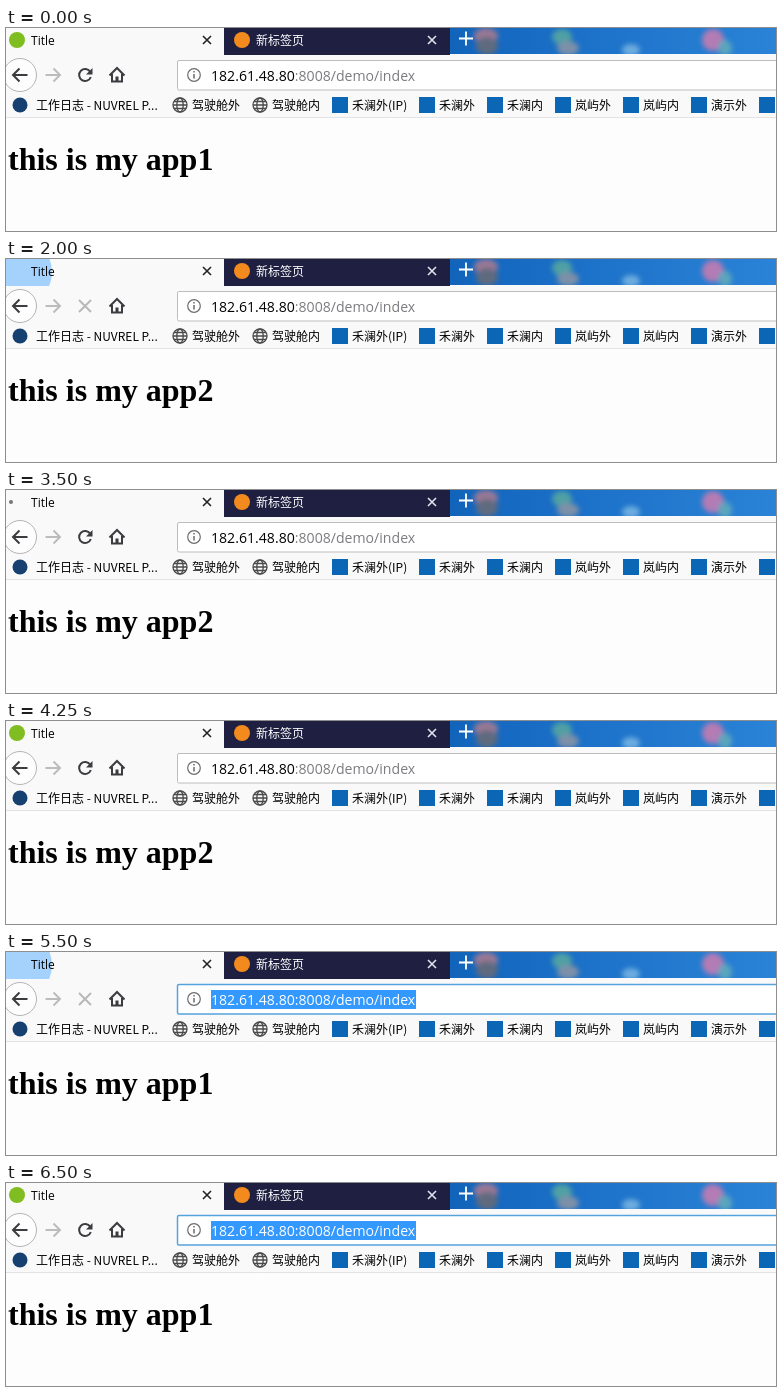
An HTML page for the animation above (7250 ms loop, 770x203 px).

```html
<!DOCTYPE html>
<html lang="zh">
<head>
<meta charset="utf-8">
<style>
  html, body { margin: 0; width: 100%; height: 100%; overflow: hidden; background: #fdfdfd; }
  svg { display: block; }
  text { white-space: pre; }
  .ui { font: 12px "Noto Sans CJK SC", "Noto Sans CJK", "Open Sans", sans-serif; }
  .title { font: 12px "Open Sans", sans-serif; }
  .url { font: 14.1px "Open Sans", sans-serif; }
  .heading { font: bold 32px "Liberation Serif", serif; }
  .line { fill: none; stroke-width: 2; }
</style>
</head>
<body>
<svg width="770" height="203" viewBox="0 0 770 203">
  <defs>
    <linearGradient id="sky">
      <stop offset="0" stop-color="#1264bb"/>
      <stop offset=".45" stop-color="#1d72c9"/>
      <stop offset="1" stop-color="#2a83d6"/>
    </linearGradient>
    <filter id="blur" x="-50%" y="-50%" width="200%" height="200%"><feGaussianBlur stdDeviation="2.5"/></filter>
    <clipPath id="skyClip"><rect x="444" width="326" height="26"/></clipPath>
    <clipPath id="tabClip"><rect width="218" height="27"/></clipPath>
    <g id="globe" fill="none" stroke="#4a4a4a" stroke-width="1.3">
      <circle r="7"/><ellipse rx="3.2" ry="7"/><path d="M-7 0H7M-6-3.5H6M-6 3.5H6"/>
    </g>
  </defs>

  <rect width="770" height="203" fill="#fdfdfd"/>
  <rect width="770" height="90" fill="#f9f9fa"/>
  <path d="M0 89.5H770" stroke="#e3e3e5"/>

  <g clip-path="url(#skyClip)">
    <rect x="444" width="326" height="26" fill="url(#sky)"/>
    <g id="blobs" filter="url(#blur)"></g>
  </g>
  <rect x="218" width="226" height="27" fill="#1f2041"/>
  <circle cx="236" cy="12" r="8" fill="#f28a1e"/>
  <text class="ui" x="250" y="16.5" fill="#fff">新标签页</text>
  <path d="M422 8l8 8m0-8l-8 8" stroke="#e4e4ee" stroke-width="1.6"/>
  <path d="M453 10.5H467M460 3.5V17.5" stroke="#fff" stroke-width="1.8"/>

  <circle id="burst" cx="11" cy="13" clip-path="url(#tabClip)" fill="#a5d1fd"/>
  <circle id="favicon" cx="11" cy="12" r="8" fill="#80bd20"/>
  <circle id="dot" cy="12" r="2" fill="#75757a"/>
  <text class="title" x="25" y="16.5" fill="#000">Title</text>
  <path d="M197 8l8 8m0-8l-8 8" stroke="#222" stroke-width="1.6"/>

  <circle cx="14" cy="47" r="16.5" fill="#fdfdfd" stroke="#b4b4b6"/>
  <path class="line" d="M21.5 47H7.5M13.5 40.5L7 47L13.5 53.5" stroke="#3c3c40"/>
  <path class="line" d="M39.5 47H53.5M47.5 40.5L54 47L47.5 53.5" stroke="#bcbcbe"/>
  <g id="reload">
    <path class="line" d="M84.2 43.8A6 6 0 1 0 84.8 49" stroke="currentColor"/>
    <path d="M86.5 40V46.5H80Z" fill="currentColor"/>
  </g>
  <path id="stop" class="line" d="M73 41l12 12m0-12l-12 12" stroke="#b8b8ba"/>
  <path class="line" d="M103.5 47.5L111 40L118.5 47.5M106 46V53.5H116V46" stroke="#3c3c40"/>
  <rect x="109.5" y="48.5" width="3" height="5" fill="#3c3c40"/>

  <rect id="field" x="171.5" y="32.5" width="620" height="29.5" rx="1.5" fill="#fff"/>
  <circle cx="188" cy="47" r="6.3" fill="none" stroke="#6c6c70" stroke-width="1.2"/>
  <path d="M188 46V50.5M188 43V44.6" stroke="#6c6c70" stroke-width="1.5"/>
  <rect id="selection" x="205" y="38" width="205" height="19" fill="#3399ff"/>
  <text class="url" x="205" y="53"><tspan id="host">182.61.48.80</tspan><tspan id="tail">:8008/demo/index</tspan></text>
  <path id="caret" d="M392.5 38V57" stroke="#111"/>

  <circle cx="14" cy="77" r="7.5" fill="#16406f"/>
  <g id="bookmarks" class="ui" fill="#000"></g>
  <text id="heading" class="heading" x="2" y="142"></text>
</svg>
<script>
const LOOP = 7250;
const $ = id => document.getElementById(id);
const show = (id, on) => $(id).setAttribute("visibility", on ? "visible" : "hidden");
const paint = (id, attrs) => { for (const k in attrs) $(id).setAttribute(k, attrs[k]); };

// Blurred wallpaper icons: x, y, rx, ry, colour
$("blobs").innerHTML = [
  [480, 8, 12, 8, "#9a7894"], [481, 18, 11, 9, "#5f6a7f"],
  [556, 9, 10, 8, "#4fa0a4"], [562, 20, 11, 7, "#7d90a8"],
  [625, 22, 9, 6, "#6cacdf"],
  [707, 12, 11, 11, "#b47cb4"], [719, 20, 7, 8, "#5aa5bd"]
].map(([x, y, rx, ry, c]) =>
  `<ellipse cx="${x}" cy="${y}" rx="${rx}" ry="${ry}" fill="${c}"/>`).join("");

const label = (x, s) => `<text x="${x}" y="82">${s}</text>`;
const globe = (x, s) => `<use href="#globe" x="${x}" y="77"/>` + label(x + 12, s);
const square = (x, s) => `<rect x="${x}" y="69" width="16" height="16" fill="#0b66b5"/>` + label(x + 20, s);
$("bookmarks").innerHTML = label(30, "工作日志 - NUVREL P...") +
  globe(174, "驾驶舱外") + globe(254, "驾驶舱内") + square(326, "禾澜外(IP)") +
  ["禾澜外", "禾澜内", "岚屿外", "岚屿内", "演示外", ""].map((s, i) => square(413 + 68 * i, s)).join("");

const idle = { focus: false, selected: false, caret: false, dot: 0, burst: 0, glow: 1, button: "reload", app: 1 };
const selectUrl = { focus: true, selected: true };
const leaveUrl = { focus: false, selected: false, caret: false };
const burst = { dot: 0, burst: 35, glow: 1, button: "stop" };
const fade = { dot: 0, burst: 225, glow: .3, button: "stop" };
const settle = { burst: 0, button: "disabled" };
const ready = { burst: 0, button: "reload" };

// Each step changes only the listed properties.
const steps = [
  [0, idle],
  [250, selectUrl],
  [500, { selected: false, caret: true }],
  [1000, { caret: false }],
  [1500, { ...leaveUrl, dot: 13 }],
  [1750, { dot: 17, button: "stop" }],
  [2000, { ...burst, app: 2 }],
  [2250, fade],
  [2500, settle],
  [2750, ready],
  [3000, selectUrl],
  [3500, { ...leaveUrl, dot: 5 }],
  [3750, { ...burst, burst: 98, glow: .75 }],
  [4000, fade],
  [4250, ready],
  [4500, selectUrl],
  [5250, { dot: 5, button: "stop" }],
  [5500, { ...burst, app: 1 }],
  [5750, fade],
  [6000, settle],
  [6250, ready]
];

function render(time) {
  const s = Object.assign({}, ...steps.filter(([t]) => t <= time).map(([, change]) => change));
  show("favicon", !s.dot && !s.burst);
  show("dot", s.dot);
  show("burst", s.burst);
  show("reload", s.button !== "stop");
  show("stop", s.button === "stop");
  show("selection", s.selected);
  show("caret", s.caret);
  paint("dot", { cx: s.dot });
  paint("burst", { r: s.burst, opacity: s.glow });
  paint("reload", { color: s.button === "disabled" ? "#b8b8ba" : "#3c3c40" });
  paint("field", { stroke: s.focus ? "#55a3dd" : "#bdbdc0", "stroke-width": s.focus ? 1.5 : 1 });
  paint("host", { fill: s.selected ? "#fff" : "#000" });
  paint("tail", { fill: s.selected ? "#fff" : s.focus ? "#000" : "#7c7c80" });
  $("heading").textContent = "this is my app" + s.app;
}

const start = performance.now();
function tick() {
  render((performance.now() - start) % LOOP);
  requestAnimationFrame(tick);
}
tick();
</script>
</body>
</html>
```
